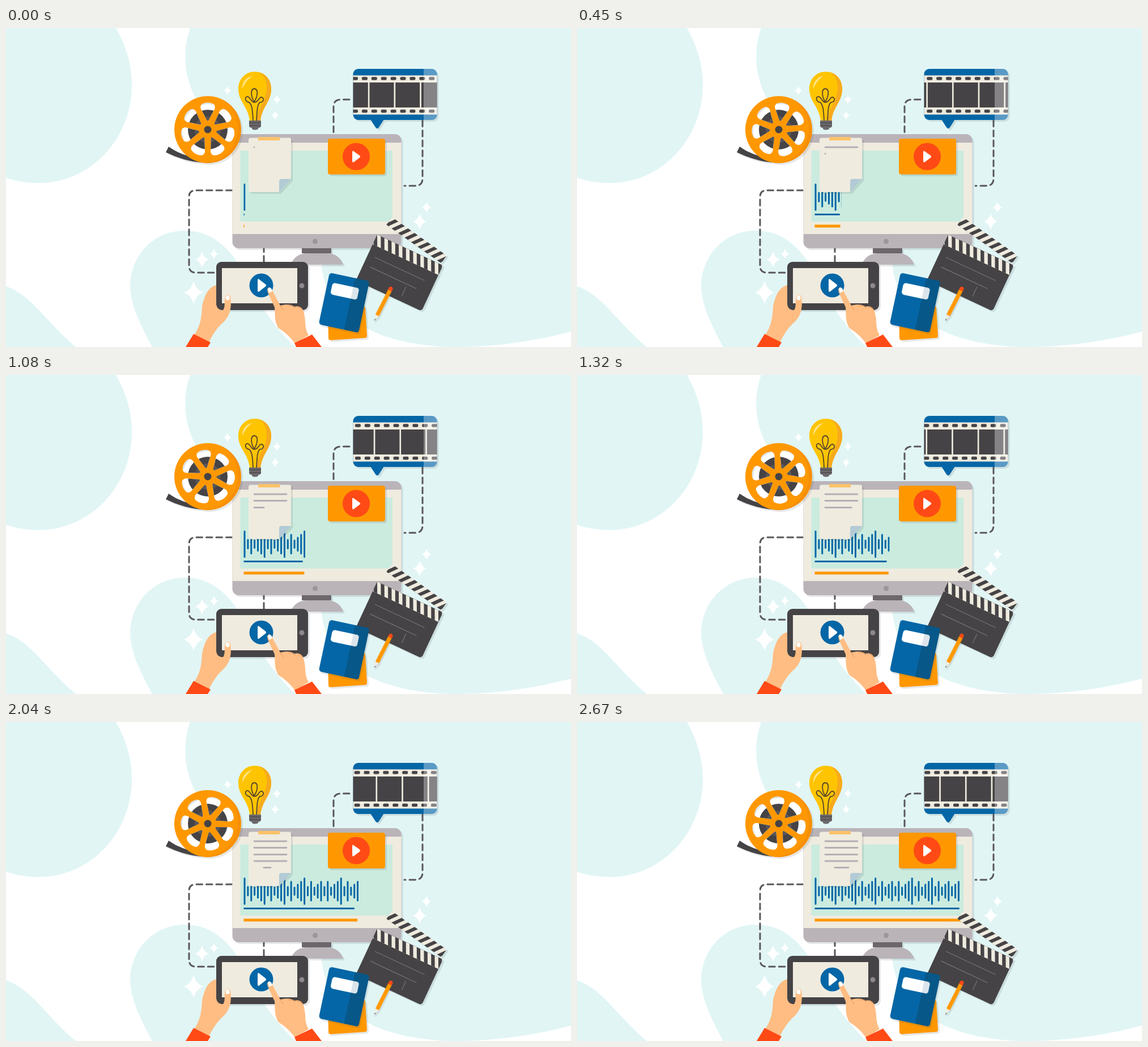
These frames come from a looping animation (997x562 px, 2700 ms). An HTML page:

```html
<!DOCTYPE html>
<html lang="en">
<head>
<meta charset="utf-8">
<title>Video production</title>
<style>
html, body { margin: 0; height: 100%; overflow: hidden; background: #fff; }
svg { display: block; width: 997px; height: 562px; }
.shadow { filter: drop-shadow(3px 3px 0 rgba(60, 70, 80, .13)); }
.teal { fill: #e1f5f5; }
.cream { fill: #efebdf; }
.gray { fill: #bab4b9; }
.dark { fill: #454345; }
.blue { fill: #0466a6; }
.orange { fill: #ff9800; }
.red { fill: #ff4a16; }
.skin { fill: #ffbd83; }
.white { fill: #fff; }
.line { fill: none; stroke-linecap: round; stroke-linejoin: round; }
.dash { fill: none; stroke: #5a575b; stroke-width: 3; stroke-dasharray: 10.5 7; stroke-linecap: round; }
</style>
</head>
<body>
<svg viewBox="0 0 997 562">
  <defs>
    <clipPath id="holes"><path id="windows"/></clipPath>
    <clipPath id="bubble"><rect x="612.5" y="72" width="148" height="90" rx="9"/></clipPath>
    <clipPath id="reveal"><rect id="wipe" x="415" y="270" width="0" height="56"/></clipPath>
    <clipPath id="board"><rect width="128" height="19"/></clipPath>
    <clipPath id="arm"><rect width="118" height="17" rx="1"/></clipPath>
  </defs>

  <g class="teal">
    <path d="M0 0H194C214 35 223 70 222 106C219 200 145 275 55 273C35 273 15 269 0 264Z"/>
    <path d="M325 0H997V535C930 552 860 563 780 562C640 556 560 500 556 410L420 190C370 175 335 140 322 92C313 60 315 28 325 0Z"/>
    <path d="M258 562C235 520 219 485 219 452C222 395 265 357 315 357C370 357 400 395 425 440C445 480 455 505 510 562Z"/>
    <path d="M0 455C45 470 72 520 123 562H0Z"/>
  </g>
  <g id="stars" class="white"/>

  <g class="dash">
    <path d="M399 286H335Q323 286 323 298V419Q323 431 335 431H372"/>
    <path d="M455 412V386"/>
    <path d="M606 126H591Q578 126 578 139V187"/>
    <path d="M735 163V265Q735 278 722 278H703"/>
  </g>

  <!-- monitor -->
  <g class="shadow">
    <path class="gray" d="M502 417C508 403 518 397 532 397H568C582 398 590 404 595 417Z"/>
    <path d="M522 387H574V397H522Z" fill="#6d676c"/>
    <rect class="gray" x="399.5" y="187" width="298" height="201" rx="11"/>
    <path class="cream" d="M399.5 202H697.5V363H399.5Z"/>
  </g>
  <circle cx="545.5" cy="376" r="4.5" fill="#9c959a"/>
  <path d="M413.5 216H682V341H413.5Z" fill="#cbebdf"/>
  <path id="wave" class="line" clip-path="url(#reveal)" stroke="#0466a6" stroke-width="3"/>
  <path id="blueBar" stroke="#0466a6" stroke-width="3"/>
  <path id="orangeBar" stroke="#ff9800" stroke-width="5"/>

  <!-- note -->
  <g class="shadow">
    <path class="cream" d="M432 193.500H500Q503 193.500 503 197V266L482 289H432Q428 289 428 285V197Q428 193.500 432 193.500Z"/>
    <path d="M482 289V270Q482 266 486 266H503Z" fill="#b2cbd6"/>
  </g>
  <path d="M445 192H483V198H445Z" fill="#fac269"/>
  <g id="notes" class="line" stroke="#b5afb5" stroke-width="2.800"/>

  <!-- video card -->
  <rect class="orange shadow" x="568" y="195" width="101" height="63" rx="4"/>
  <circle class="red" cx="618" cy="226.500" r="24"/>
  <path class="white" d="M611 219Q611 215 614 217.500L624.500 225Q626 226.500 624.500 228L614 236Q611 238 611 234Z"/>

  <!-- bulb -->
  <g>
    <path d="M439 77C456 77 468 90 468 107C468 130 452 138 449 163H430C427 138 410 130 410 107C410 90 422 77 439 77Z" fill="#ffc400"/>
    <path d="M447 78C460 82 468 93 468 107C468 130 452 138 449 163H442C445 139 460 128 460 105C460 93 456 84 447 78Z" fill="#f7aa1d"/>
    <path d="M417 107C416 96 423 87 435 84C427 90 421 97 417 107Z" fill="#ffe387"/>
    <path class="line" stroke="#55452e" stroke-width="1.800" d="M436 163C435 143 434 135 429 131C422 130 421 122 425 121C431 120 432 131 438 131C446 131 446 121 451 122C456 123 455 131 448 131C443 135 443 148 442 163M438 130C431 119 432 107 438 107C445 107 445 119 438 130"/>
    <path d="M429 163H450V173Q449 176 445 176V178Q439 181 434 178V176Q430 176 429 173Z" fill="#6c686c"/>
    <path d="M429 167H450M430 172H449" stroke="#4c494c" stroke-width="1.500"/>
  </g>

  <!-- reel -->
  <g class="shadow">
    <path class="dark" d="M287 209L282 219C303 229 325 236 347 237L340 229C318 226 301 219 287 209Z"/>
    <circle class="orange" cx="356" cy="179" r="59"/>
  </g>
  <path d="M378 124.500A59 59 0 0 1 345 237A60 60 0 0 0 378 124.500Z" fill="#f68f08"/>
  <g transform="translate(356 179)">
    <g clip-path="url(#holes)">
      <circle r="55" fill="#dfe5ea"/>
      <circle class="white" cx="2" cy="2" r="47"/>
      <circle class="dark" r="35"/>
      <circle r="23" fill="#595659"/>
    </g>
    <circle r="10" class="orange"/>
    <circle r="6.500" class="dark"/>
  </g>

  <!-- film bubble -->
  <g class="shadow blue">
    <rect x="612.500" y="72" width="148" height="90" rx="9"/>
    <path d="M643 161H667L658 175Q655 179 652 175Z"/>
  </g>
  <g clip-path="url(#bubble)">
    <path class="cream" d="M612 83.500H761V152.500H612Z"/>
    <g id="film" class="dark"/>
    <path d="M737 72H761V162H737Z" fill="#fff" opacity=".34"/>
  </g>

  <!-- clapperboard -->
  <g class="shadow">
    <g transform="translate(655 364) rotate(25)">
      <rect class="dark" width="128" height="89" rx="5"/>
      <g clip-path="url(#board)"><path class="cream" d="M0 0H128V19H0Z"/><path id="boardStripes" class="dark"/></g>
      <path d="M13 38H110M13 57H103M85 62V80" stroke="#777377" stroke-width="1.200"/>
    </g>
    <g transform="translate(681 333) rotate(35)" clip-path="url(#arm)">
      <path class="cream" d="M0 0H118V17H0Z"/><path id="armStripes" class="dark"/>
    </g>
  </g>

  <!-- books and pencil -->
  <path class="orange shadow" d="M568 500L630 490Q633 489 634 493L637 542Q637 546 633 546L573 550Q569 550 569 546Z"/>
  <g class="shadow" transform="translate(571 431) rotate(12)">
    <rect class="blue" width="72" height="93" rx="5"/>
    <path d="M46 0H67Q72 0 72 5V88Q72 93 67 93H46Z" fill="#075788"/>
    <rect class="white" x="9" y="16" width="48" height="21" rx="5"/>
    <path d="M46 16H52Q57 16 57 21V32Q57 37 52 37H46Z" fill="#dce5eb"/>
  </g>
  <g class="shadow" transform="translate(650 516) rotate(27)">
    <path class="cream" d="M0 0L-3.500 -12H3.500Z"/>
    <path class="orange" d="M-3.500 -11V-60H3.500V-11Z"/>
    <path class="red" d="M-3.500 -60V-65Q0 -70 3.500 -65V-60Z"/>
    <path class="dark" d="M0 0L-1 -3.500H1Z"/>
  </g>

  <!-- phone -->
  <g class="shadow">
    <rect class="dark" x="371" y="412" width="162" height="85" rx="9"/>
    <path class="cream" d="M381 423H514V485H381Z"/>
  </g>
  <circle cx="522" cy="454" r="4.500" fill="#8c888c"/>
  <circle class="blue" cx="450.500" cy="453.500" r="21"/>
  <path class="white" d="M444 445Q444 440.500 447 443L458.500 452Q460 453.500 458.500 455L447 464Q444 466.500 444 462Z"/>

  <!-- hands -->
  <g class="skin">
    <path d="M332 541C343 525 345 510 346 491C350 470 358 456 371 453V487Q372 495 380 497H383C388 490 384 481 387 473Q392 467 396 473C398 490 397 504 385 517C372 528 365 540 358 554Z"/>
    <path d="M461 461Q463 454 468 459L484 489C495 486 504 487 509 491C519 488 525 495 526 503C530 520 526 528 534 541L510 556C502 545 494 537 481 529C473 517 475 505 474 492L462 466Z"/>
  </g>
  <g class="white">
    <path d="M387.500 478V474Q391 468 394.500 473V478Q391 481 387.500 478Z"/>
    <path d="M462 460Q464 455 468 459L470 463Q467 467 464 466Z"/>
  </g>
  <path class="line" stroke="#ef9f63" stroke-width="1.200" d="M484 489L489 497M498 490Q505 488 510 493M514 492Q519 491 523 497"/>
  <g class="red">
    <path d="M331 539L361 554L356 562H317Z"/>
    <path d="M509 555L540 540L557 562H512Z"/>
  </g>
</svg>
<script>
const LOOP = 2700, STEP = 30;
const $ = id => document.getElementById(id);
const range = (n, f) => Array.from({ length: n }, (_, i) => f(i));
const setPath = (id, d) => $(id).setAttribute('d', d);

const star = (x, y, r) => {
  const k = r * .22;
  return `<path d="M${x} ${y - r}Q${x + k} ${y - k} ${x + r * .85} ${y}Q${x + k} ${y + k} ${x} ${y + r}Q${x - k} ${y + k} ${x - r * .85} ${y}Q${x - k} ${y - k} ${x} ${y - r}Z"/>`;
};
$('stars').innerHTML = [
  [391, 110, 8], [478, 126, 8], [475, 154, 8], [346, 408, 14],
  [367, 398, 9], [331, 466, 20], [730, 341, 14], [742, 316, 10]
].map(s => star(...s)).join('');

// Half heights of the sound wave
const pulse = [9, 18, 8, 13, 18, 24], rest = pulse.slice(0, 5);
const levels = [24, ...pulse, ...pulse, ...pulse, ...rest, ...pulse, ...pulse, ...rest, 9, 13, 18];
setPath('wave', levels.map((h, i) => `M${421 + i * 5.87} ${299.5 - h}v${2 * h - 3}`).join(''));

const stripes = (height, slant) => range(11, i => {
  const x = i * 14 - 7;
  return `M${x} 0h7l${slant} ${height}h-7Z`;
}).join('');
setPath('boardStripes', stripes(19, 9));
setPath('armStripes', stripes(17, -10));

const hole = (x, y) => `<rect x="${x}" y="${y}" width="10" height="5.5" rx="2"/>`;
$('film').innerHTML =
  range(8, i => `<rect x="${458.7 + i * 45.7}" y="96" width="43" height="44"/>`).join('') +
  range(20, i => hole(442 + i * 16.9, 86.3) + hole(442 + i * 16.9, 143.7)).join('');

// Seven tapered windows in the reel
const polar = (r, a) => `${r * Math.sin(a)} ${-r * Math.cos(a)}`;
setPath('windows', range(7, i => {
  const p = (r, d) => polar(r, i * Math.PI * 2 / 7 + d);
  return `M${p(17, -.1)}L${p(39, -.32)}Q${p(47, -.3)} ${p(47, -.15)}Q${p(49, 0)} ${p(47, .15)}Q${p(47, .3)} ${p(39, .32)}L${p(17, .1)}Q${p(14, 0)} ${p(17, -.1)}Z`;
}).join(''));

// Note lines: x, y, length, start time, duration
const notes = [
  [438, 210, 57, 0, 450], [438, 221.5, 57, 450, 490], [438, 233.5, 57, 940, 470],
  [438, 245, 57, 1410, 480], [455, 256.5, 24, 1890, 300]
];
$('notes').innerHTML = notes.map(() => '<path/>').join('');

function draw(t) {
  $('film').setAttribute('transform', `translate(${t * .0515})`);
  $('windows').setAttribute('transform', `rotate(${t / LOOP * 360})`);
  $('wipe').setAttribute('width', 7.5 + t * .0978);
  setPath('blueBar', `M419.5 328.500H${421 + t * .095}`);
  setPath('orangeBar', `M419.500 349H${420.7 + t * .0978}`);
  notes.forEach(([x, y, length, start, duration], i) => {
    const part = Math.min(1, (t - start) / duration);
    $('notes').children[i].setAttribute('d', part < 0 ? '' : `M${x} ${y}h${length * part}`);
  });
}

function tick() {
  const t = performance.now() % LOOP;
  draw(Math.floor(t / STEP) * STEP);
  requestAnimationFrame(tick);
}
tick();
</script>
</body>
</html>
```
